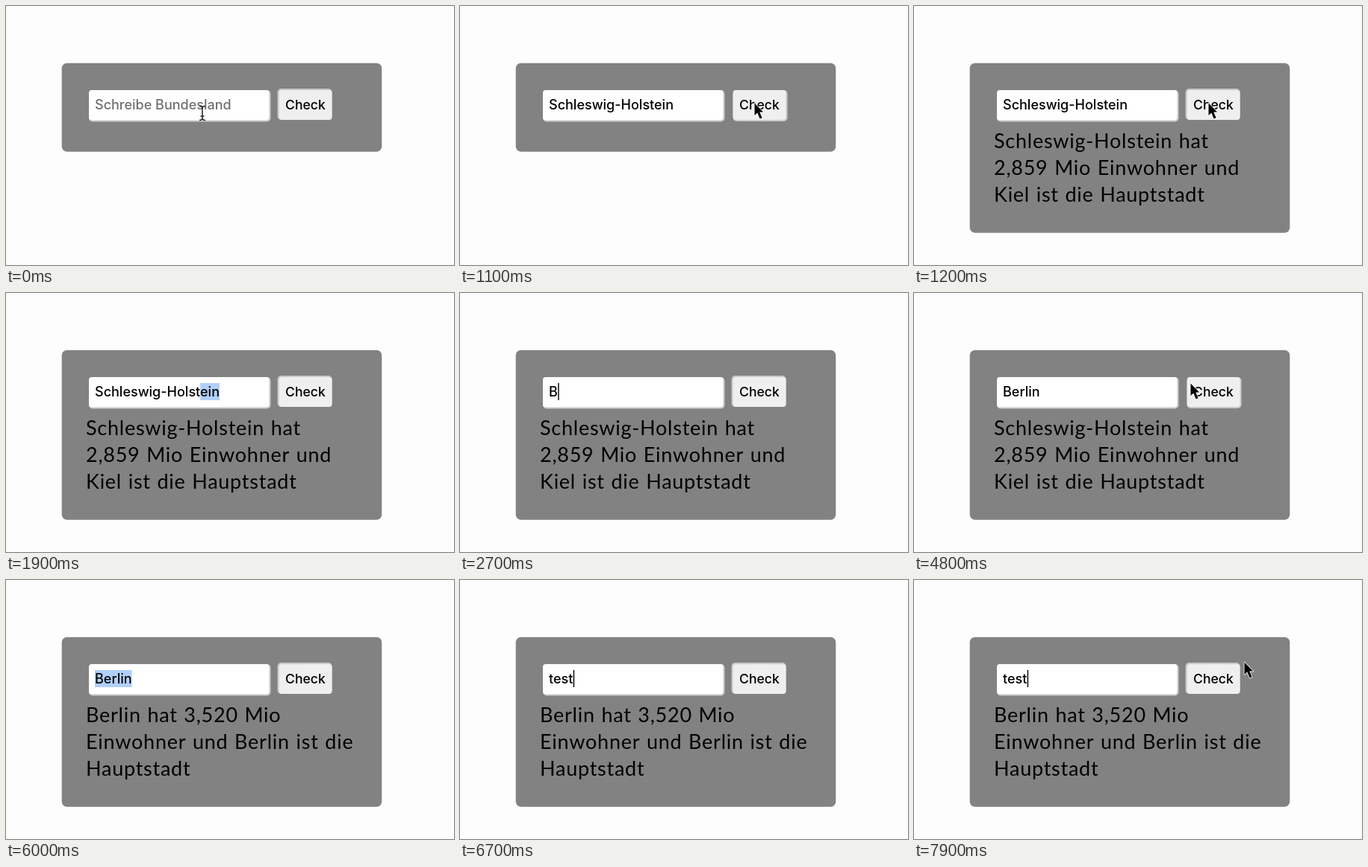
Write an HTML page with a canvas that moves like this. It is 600 px wide and 348 px high and loops after 8 s.

```html
<!DOCTYPE html>
<html lang="de">
<head>
<meta charset="utf-8">
<title>Bundesland-Check</title>
<style>
  html, body { margin: 0; height: 100%; overflow: hidden; background: #fdfdfd; }
  canvas { display: block; width: 600px; height: 348px; }
</style>
</head>
<body>
<canvas id="stage"></canvas>
<script>
const LOOP = 8000, STEP = 100;
const UI_FONT = '450 18px Inter, sans-serif';
const BUTTON_FONT = '450 17.6px Inter, sans-serif';
const RESULT_FONT = '27px Lato, sans-serif';
const TEXT_X = 119, TEXT_Y = 139;

const canvas = document.getElementById('stage');
const ctx = canvas.getContext('2d');
const ratio = window.devicePixelRatio || 1;
canvas.width = 600 * ratio;
canvas.height = 348 * ratio;
ctx.scale(ratio, ratio);

// Tracks hold [start time, value, ...]; values stay until the next entry.
const input = [
  [0, ''], [100, 'Schleswig-Holstein'], [2700, 'B'], [2900, 'Be'], [3000, 'Ber'],
  [3100, 'Berl'], [3300, 'Berli'], [3400, 'Berlin'],
  [6200, 't'], [6400, 'te'], [6500, 'tes'], [6700, 'test']
];
// Number of characters selected, counted from the end of the input.
const selected = [
  [0, 0], [1900, 3], [2000, 7], [2100, 11], [2200, 15], [2300, 18], [2700, 0],
  [5700, 2], [5800, 5], [6000, 6], [6200, 0]
];
const caret = [[0, false], [2700, true], [3600, false], [6200, true], [7300, false], [7700, true]];
const pressed = [[0, false], [1000, true], [1200, false], [4700, true], [4900, false]];
const result = [
  [0, []],
  [1200, ['Schleswig-Holstein hat', '2,859 Mio Einwohner und', 'Kiel ist die Hauptstadt']],
  [4900, ['Berlin hat 3,520 Mio', 'Einwohner und Berlin ist die', 'Hauptstadt']]
];
// [time, pointer shape, x, y]; positions glide between entries.
const pointer = [
  [0, 'beam', 263, 144], [200, 'beam', 263, 144], [500, 'arrow', 350, 134],
  [600, 'arrow', 398, 122], [700, 'arrow', 394, 130], [1200, 'arrow', 394, 130],
  [1400, 'beam', 362, 132], [1700, 'beam', 336, 133], [1800, 'beam', 336, 133],
  [1900, 'none', 403, 122], [3600, 'arrow', 403, 122], [3900, 'arrow', 403, 122],
  [4600, 'arrow', 370, 121], [4900, 'arrow', 370, 121], [5000, 'beam', 340, 130],
  [5300, 'beam', 251, 132], [5400, 'beam', 251, 132], [5600, 'beam', 176, 133],
  [5700, 'none', 455, 76], [7700, 'arrow', 455, 76], [7900, 'arrow', 442, 110]
];

const indexAt = (track, t) => track.findLastIndex(entry => entry[0] <= t);
const valueAt = (track, t) => track[indexAt(track, t)][1];

function pointerAt(t) {
  const i = indexAt(pointer, t);
  const [t0, shape, x0, y0] = pointer[i];
  const [t1, , x1, y1] = pointer[i + 1] || [LOOP, shape, x0, y0];
  const k = (t - t0) / (t1 - t0);
  return { shape, x: x0 + (x1 - x0) * k, y: y0 + (y1 - y0) * k };
}

function box(x, y, w, h, radius, color) {
  ctx.fillStyle = color;
  ctx.beginPath();
  ctx.roundRect(x, y, w, h, radius);
  ctx.fill();
}

// The dark half of the bevel blends into the panel, so only the light half shows.
function bevel(x, y, w, h, fill, inset) {
  const shift = inset ? 2 : 0;
  box(x + shift, y + shift, w - 2, h - 2, 5, '#cacaca');
  box(x + 2, y + 2, w - 4, h - 4, 4, fill);
}

function text(string, x, y, font, color = '#000') {
  ctx.font = font;
  ctx.fillStyle = color;
  ctx.fillText(string, x, y);
}

function textWidth(string) {
  ctx.font = UI_FONT;
  return ctx.measureText(string).width;
}

function drawInput(t) {
  const value = valueAt(input, t);
  const count = valueAt(selected, t);
  bevel(109, 111, 245.5, 44.5, '#fff', true);
  if (count) {
    const start = textWidth(value.slice(0, value.length - count));
    ctx.fillStyle = '#b1cffa';
    ctx.fillRect(TEXT_X + start, 121, textWidth(value) - start, 23);
  }
  if (value) text(value, TEXT_X, TEXT_Y, UI_FONT);
  else text('Schreibe Bundesland', TEXT_X, TEXT_Y, UI_FONT, '#707070');
  if (valueAt(caret, t)) {
    ctx.fillStyle = '#000';
    ctx.fillRect(TEXT_X + textWidth(value) + 0.4, 121, 1.4, 23);
  }
}

function drawResult(lines) {
  ctx.letterSpacing = '0.75px';
  ctx.wordSpacing = '1px';
  lines.forEach((line, i) => text(line, 107, 191 + i * 36.2, RESULT_FONT));
  ctx.letterSpacing = ctx.wordSpacing = '0px';
}

function drawPointer({ shape, x, y }) {
  if (shape === 'none') return;
  ctx.save();
  ctx.translate(x, y);
  ctx.lineJoin = 'round';
  if (shape === 'arrow') {
    const path = new Path2D('M.5 .5V17L4.3 13.6 7.6 21.5 10.6 20.2 7.3 12.6H12.2Z');
    ctx.strokeStyle = '#fff';
    ctx.lineWidth = 1.6;
    ctx.stroke(path);
    ctx.fillStyle = '#000';
    ctx.fill(path);
  } else {
    const path = new Path2D('M-4-9.5Q0-9.5 0-6.5Q0-9.5 4-9.5M0-6.5V6.5M-4 9.5Q0 9.5 0 6.5Q0 9.5 4 9.5M-2.5 4H2.5');
    ctx.strokeStyle = '#222';
    ctx.lineWidth = 1.5;
    ctx.stroke(path);
  }
  ctx.restore();
}

function draw(t) {
  const lines = valueAt(result, t);
  ctx.fillStyle = '#fdfdfd';
  ctx.fillRect(0, 0, 600, 348);
  box(74.7, 76.7, 428.6, lines.length ? 228 : 119, 7, '#828282');
  drawInput(t);
  bevel(363.6, 111, 75, 44, '#efefef', valueAt(pressed, t));
  text('Check', 374, TEXT_Y, BUTTON_FONT);
  drawResult(lines);
  drawPointer(pointerAt(t));
}

const startTime = performance.now();
function frame() {
  const t = (performance.now() - startTime) % LOOP;
  draw(Math.floor(t / STEP) * STEP);
  requestAnimationFrame(frame);
}
frame();
</script>
</body>
</html>
```
